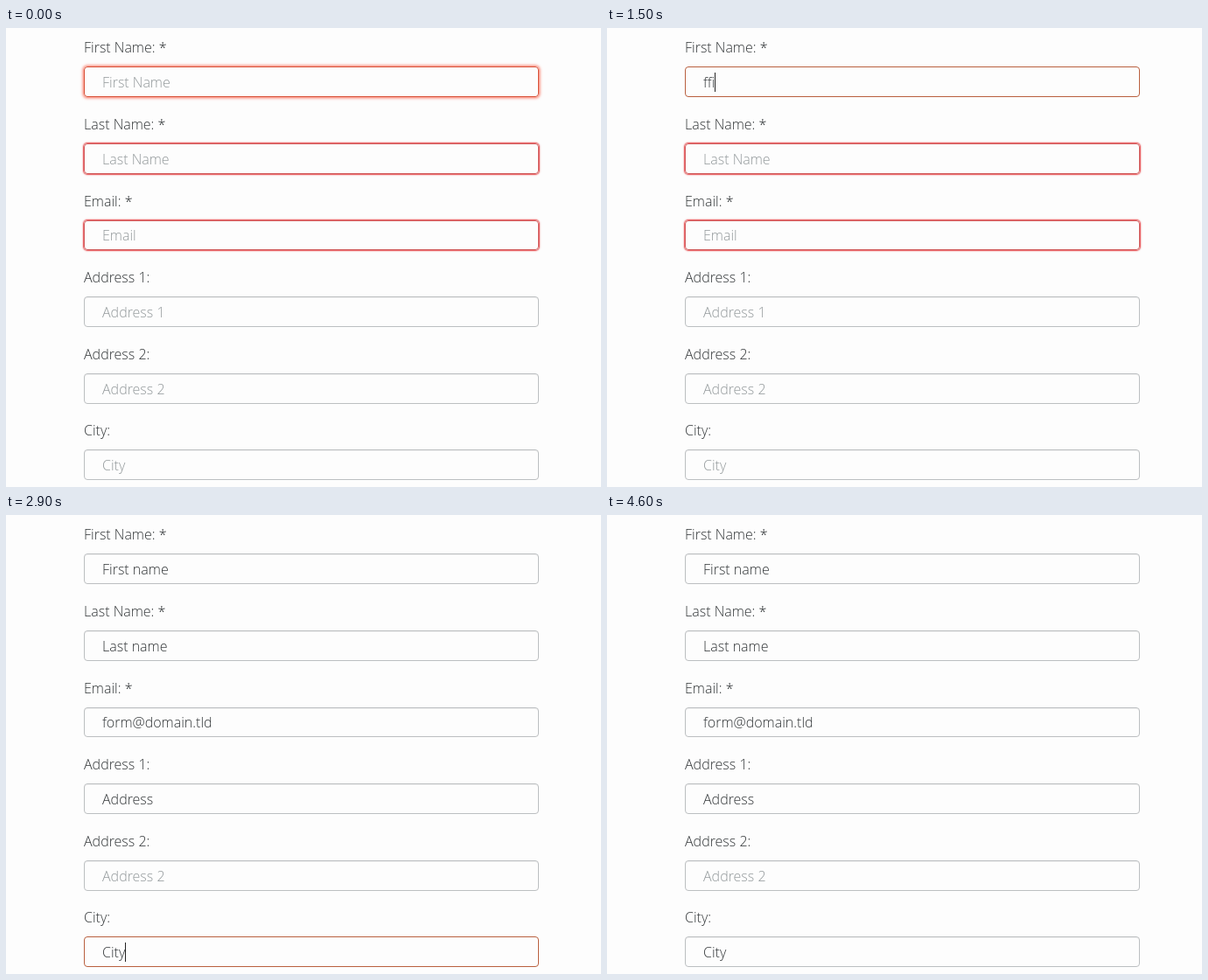
Animation of 680x525 px, one loop 4700 ms. Source, as an HTML page:

```html
<!DOCTYPE html>
<html lang="en">
<head>
<meta charset="utf-8">
<style>
html, body { margin: 0; width: 100%; height: 100%; overflow: hidden; background: #fdfdfd; }
body { position: relative; font: 300 16px/20px "Open Sans", sans-serif; color: #303436; }
label, .box, .text { position: absolute; white-space: pre; }
label { left: 89px; }
.box {
  left: 89px; width: 520px; box-sizing: border-box;
  border: 1px solid #bcbfc1; border-radius: 4px;
  box-shadow: inset 0 1px 1px rgba(0, 0, 0, .06);
}
.box.invalid { border-color: #d06060; box-shadow: 0 0 1.5px 1px rgba(226, 42, 46, .88); }
.box.focus { border-color: #b9603f; box-shadow: none; }
.text { left: 110px; }
.text.hint { color: #92989a; }
.text.caret::after {
  content: ""; position: absolute; left: 100%; top: -1px;
  width: 1px; height: 22px; background: #222;
}
</style>
</head>
<body>
<script>
const LOOP = 4700, FILL = 2900, BLUR = 4400;
const TYPED = [[500, "f"], [900, "ff"], [1400, "ffi"], [1800, "ffil"], [2300, "ffill"]];

// label, placeholder, filled value, label top, box top, box height, text top
const FIELDS = [
  ["First Name: *", "First Name", "First name", 12, 44, 35, 52],
  ["Last Name: *", "Last Name", "Last name", 100, 132, 35, 140],
  ["Email: *", "Email", "form@domain.tld", 188, 220, 34, 227],
  ["Address 1:", "Address 1", "Address", 275, 307, 35, 315],
  ["Address 2:", "Address 2", "", 363, 395, 35, 403],
  ["City:", "City", "City", 450, 482, 35, 490],
];

function add(tag, cls, top, text = "") {
  const el = document.createElement(tag);
  el.className = cls;
  el.style.top = top + "px";
  el.textContent = text;
  document.body.append(el);
  return el;
}

const rows = FIELDS.map(([label, hint, value, labelTop, boxTop, height, textTop]) => {
  add("label", "", labelTop, label);
  const box = add("div", "box", boxTop);
  box.style.height = height + "px";
  return { hint, value, box, text: add("span", "text", textTop) };
});

function draw(t) {
  const filled = t >= FILL;
  const typed = TYPED.reduce((last, [at, s]) => t >= at ? s : last, "");
  const focused = !filled ? 0 : t < BLUR ? 5 : -1;
  rows.forEach(({ hint, value, box, text }, i) => {
    const content = filled ? value : i === 0 ? typed : "";
    const focus = i === focused;
    const invalid = !filled && (i === 1 || i === 2);
    box.className = "box" + (focus ? " focus" : invalid ? " invalid" : "");
    text.className = "text" + (content ? "" : " hint") + (focus && content ? " caret" : "");
    text.textContent = content || hint;
  });

  // The empty required field glows until typing begins.
  const glow = Math.max(0, Math.min(1, (600 - t) / 200));
  const first = rows[0].box.style;
  first.boxShadow = glow ? `0 0 3px 1.5px rgba(250, 80, 56, ${0.65 * glow})` : "";
  first.borderColor = glow ? `rgb(${185 + 30 * glow}, ${96 - 16 * glow}, ${63 - 8 * glow})` : "";
}

const start = performance.now();
function tick() {
  draw((performance.now() - start) % LOOP);
  requestAnimationFrame(tick);
}
tick();
</script>
</body>
</html>
```
